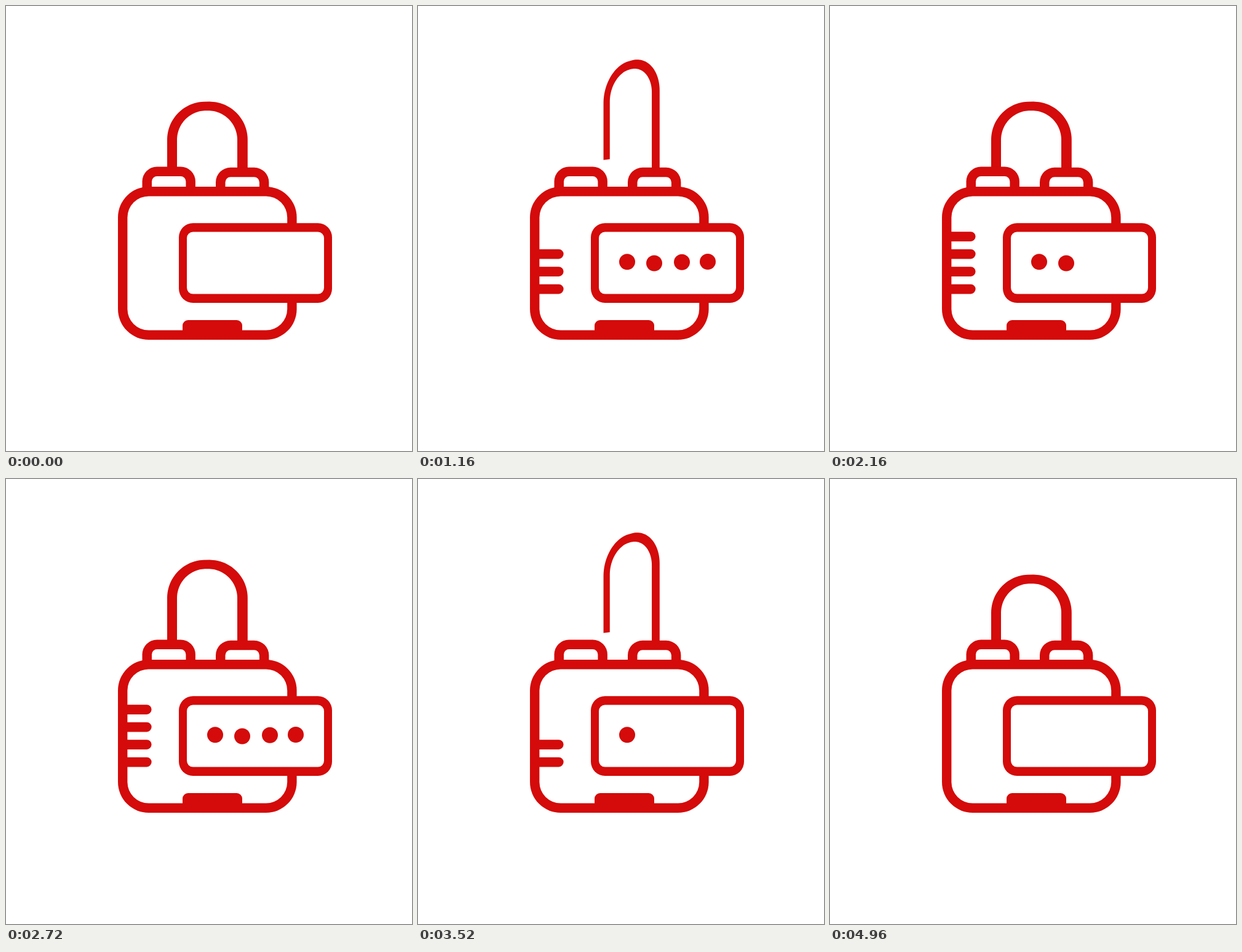
Recreate the animation shown at these times as an HTML page with a canvas. Size 660 by 724 pixels, loop 5040 ms.

```html
<!DOCTYPE html>
<html lang="en">
<head>
<meta charset="utf-8">
<title>Padlock</title>
<style>
  html, body { margin: 0; width: 100%; height: 100%; overflow: hidden; background: #fff; }
  canvas { display: block; }
</style>
</head>
<body>
<canvas width="660" height="724"></canvas>
<script>
const ctx = document.querySelector('canvas').getContext('2d');
const RED = '#d40b0a', WHITE = '#fff';
const LOOP = 5040, STEP = 40;
const CAMERA = { x: 330, y: 362, zoom: 916.7 };
const HINGE = 392.8, LIFT = 80, SWING = 44 * Math.PI / 180;
const DOTS = [[340, 416.2], [384, 418.5], [429, 416.7], [471, 416]];

const ramp = (t, start, duration) => Math.min(1, Math.max(0, (t - start) / duration));
// Rises from 0 to 1, holds, and falls back.
const pulse = (t, up, rise, down, fall) => ramp(t, up, rise) - ramp(t, down, fall);

function box(x, y, width, height, radius, color = RED) {
  ctx.fillStyle = color;
  ctx.beginPath();
  ctx.roundRect(x, y, width, height, radius);
  ctx.fill();
}

function frame(x, y, width, height, radius, side, top = side) {
  box(x, y, width, height, radius);
  box(x + side, y + top, width - 2 * side, height - 2 * top, radius - side, WHITE);
}

// Points along the top of an arch, left to right.
function arch(left, right, top, radius) {
  return Array.from({ length: 65 }, (_, i) => {
    const angle = Math.PI * (1 - i / 64);
    const centre = i < 32 ? left + radius : right - radius;
    return [centre + radius * Math.cos(angle), top + radius * (1 - Math.sin(angle))];
  });
}

const SHACKLE = [
  [262, 319.4], ...arch(262, HINGE, 155.6, 62), [HINGE, 350],
  [376, 350], ...arch(278, 376, 170.2, 47.5).reverse(), [278, 319.4],
];

// Swings about the right leg, seen in perspective.
function drawShackle(lift, angle) {
  ctx.fillStyle = RED;
  ctx.beginPath();
  for (const [x, y] of SHACKLE) {
    const reach = HINGE - x;
    const scale = CAMERA.zoom / (CAMERA.zoom + reach * Math.sin(angle));
    ctx.lineTo(
      CAMERA.x + (HINGE - reach * Math.cos(angle) - CAMERA.x) * scale,
      CAMERA.y + (y - lift - CAMERA.y) * scale
    );
  }
  ctx.fill();
}

// Bars fill upwards at one pace and drain downwards at a slower one.
function drawBars(t) {
  for (let i = 0; i < 4; i++) {
    if (t >= 280 + 440 * i && t < 4640 - 600 * i) {
      box(190, 452.8 - 28.5 * i, 46.6, 15.6, [0, 7.8, 7.8, 0]);
    }
  }
}

// Dots are typed one by one, held, then cleared for the next round.
function drawDots(t) {
  const elapsed = (t - 230 + LOOP) % LOOP % 1640;
  if (t < 230 || t >= 4960 || elapsed >= 1490) return;
  DOTS.forEach(([x, y], i) => {
    if (elapsed >= 245 * i) box(x - 13, y - 13, 26, 26, 13);
  });
}

function draw(t) {
  ctx.fillStyle = WHITE;
  ctx.fillRect(0, 0, 660, 724);

  const lift = pulse(t, 0, 360, 1560, 400) + pulse(t, 2600, 400, 4160, 400);
  const swing = pulse(t, 320, 200, 1320, 240) + pulse(t, 3000, 200, 4000, 240);
  drawShackle(LIFT * lift, SWING * swing);

  frame(221.5, 261.4, 86.4, 70, 24, 15.5);
  frame(341, 262.8, 86.4, 70, 24, 15.5);
  frame(182, 294, 290.6, 249, 50, 15.4);
  box(287, 511, 97, 25, 9);
  drawBars(t);
  frame(281, 353.2, 249, 129.8, 23, 13, 14.4);
  drawDots(t);
}

function tick() {
  draw(Math.floor(performance.now() % LOOP / STEP) * STEP);
  requestAnimationFrame(tick);
}
tick();
</script>
</body>
</html>
```
